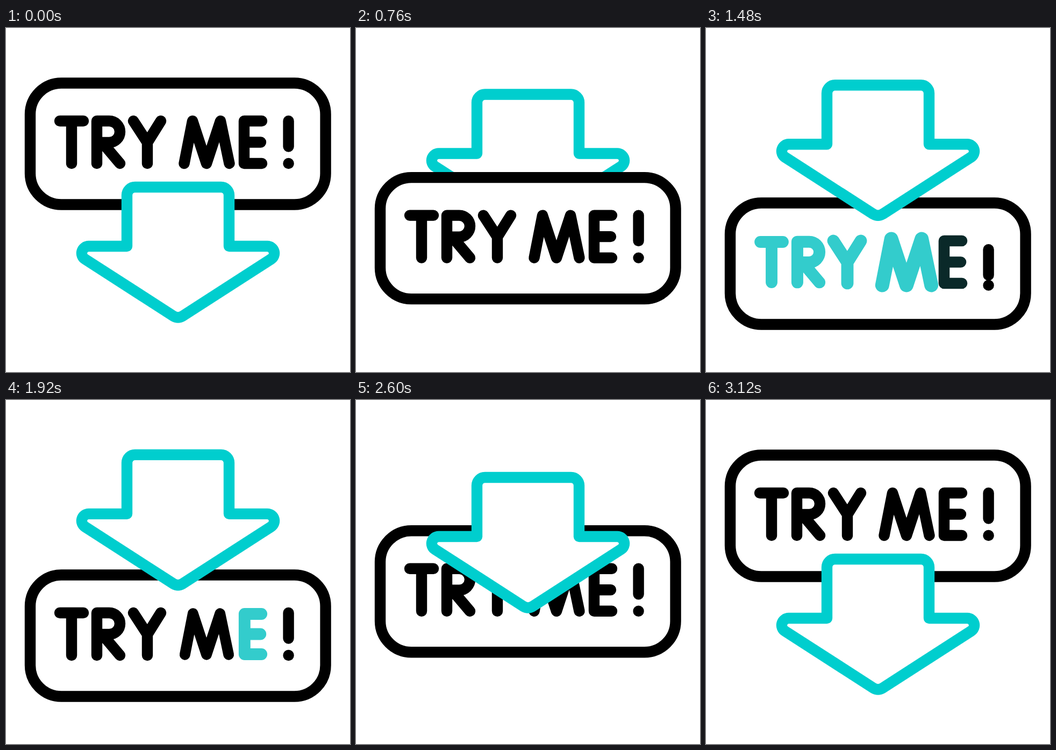
Animation of 640x640 px, one loop 3.72 s. Source, as an HTML page:

```html
<!DOCTYPE html>
<html lang="en">
<head>
<meta charset="utf-8">
<title>Try me</title>
<style>
  html, body { margin: 0; width: 100%; height: 100%; overflow: hidden; background: #fff; }
  svg { display: block; width: 100vw; height: 100vh; }
  path, rect { stroke-width: 20.4; stroke-linecap: round; stroke-linejoin: round; }
  #letters path { fill: none; stroke: #000; }
</style>
</head>
<body>
<svg id="stage" viewBox="0 0 640 640" role="img" aria-label="TRY ME !">
  <g id="button">
    <rect x="45" y="102.5" width="549.6" height="226" rx="58" fill="#fff" stroke="#000"/>
    <g id="letters">
      <path d="M100 173H144M122 173V252"/>
      <path d="M169 252V173H192A20 20 0 0 1 192 213H179L212 252"/>
      <path d="M237 173L263 213L288 173M263 213V252"/>
      <path d="M331.5 252L347 173L373 252L399 173L415.5 252"/>
      <path d="M476 173H443V252H476M443 212.5H474"/>
      <path id="bar" d="M525.6 173V220.5"/>
      <path id="dot" d="M525.6 252h.01"/>
    </g>
  </g>
  <path id="arrow" fill="#fff" stroke="#00cece" d="M225 406V311A15 15 0 0 1 240 296H400A15 15 0 0 1 415 311V406H486A13 13 0 0 1 493 430L328.5 536Q320 541 311.5 536L147 430A13 13 0 0 1 154 406Z"/>
</svg>
<script>
const LOOP = 3720, STEP = 40, LAST = 3120;
const $ = id => document.getElementById(id);
const stage = $('stage'), button = $('button'), arrow = $('arrow'), bar = $('bar'), dot = $('dot');

const linear = p => p;
const smooth = p => p * p * (3 - 2 * p);
const rise = p => 1 - Math.cos(p * Math.PI / 2);
const fall = p => Math.sin(p * Math.PI / 2);
const settle = p => smooth(1 - Math.pow(1 - p, 1.55));

// Keys are [time, value, easing into this key].
function track(keys, t) {
  if (t <= keys[0][0]) return keys[0][1];
  for (let i = 1; i < keys.length; i++) {
    const [t0, v0] = keys[i - 1], [t1, v1, ease = smooth] = keys[i];
    if (t < t1) return v0 + (v1 - v0) * ease((t - t0) / (t1 - t0));
  }
  return keys[keys.length - 1][1];
}

const buttonY = [[429, 0], [900, 223], [2388, 223], [3120, 0, settle]];
const arrowY = [[0, 0], [446, 58], [900, -240], [1660, -186, fall],
                [2360, -235.3, rise], [2396, -235.3], [3120, 0, settle]];
const barY = [[980, 0], [1120, 29], [1240, 29], [1760, 0]];
const dotY = [[1100, 0], [1240, 14], [1600, 0]];

// Letter pulse, timed from the peak.
const scaleKeys = [[-140, 1], [0, 1.09], [80, 1], [260, .95], [360, .95], [520, 1]];
const boldKeys = [[-140, 0], [-80, 2.5], [0, 4], [100, 2.5], [330, 2.5], [400, 0]];
const tintKeys = [[-140, 0], [-90, 1, linear], [330, 1], [400, 0, linear]];

const letters = [...document.querySelectorAll('#letters path')].slice(0, 5).map((el, i) => {
  const b = el.getBBox();
  return { el, cx: b.x + b.width / 2, cy: b.y + b.height / 2, peak: 1150 + 115 * i };
});

const shift = (el, y) => el.setAttribute('transform', `translate(0 ${y})`);

function pulse({ el, cx, cy, peak }, t) {
  const at = t - peak, s = track(scaleKeys, at), k = track(tintKeys, at);
  el.setAttribute('transform', `translate(${cx} ${cy}) scale(${s}) translate(${-cx} ${-cy})`);
  el.style.strokeWidth = 20.4 + track(boldKeys, at) / s;
  el.style.stroke = `rgb(${51 * k}, ${204 * k}, ${204 * k})`;
}

function draw(t) {
  shift(button, track(buttonY, t));
  shift(arrow, track(arrowY, t));
  shift(bar, track(barY, t));
  shift(dot, track(dotY, t));
  letters.forEach(l => pulse(l, t));
  // The arrow passes behind the button on its way up.
  const front = t > 446 && t < 900 ? button : arrow;
  if (stage.lastElementChild !== front) stage.appendChild(front);
}

const start = performance.now();
function tick() {
  const t = (performance.now() - start) % LOOP;
  draw(Math.min(LAST, Math.floor(t / STEP) * STEP));
  requestAnimationFrame(tick);
}
tick();
</script>
</body>
</html>
```
